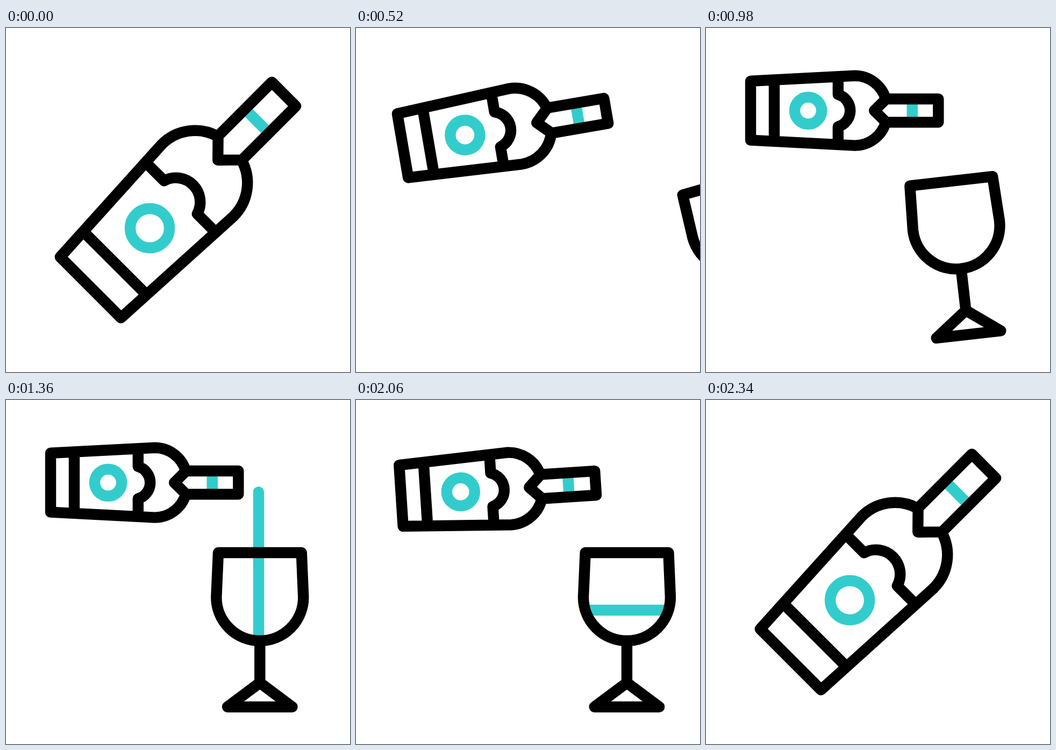
An HTML page with a canvas for the animation above (2.4 s loop, 640 by 640 pixels).

```html
<!DOCTYPE html>
<html lang="en">
<head>
<meta charset="utf-8">
<title>Pouring wine</title>
<style>
  html, body { margin: 0; width: 100%; height: 100%; overflow: hidden; background: #fff; }
  canvas { display: block; width: 640px; height: 640px; }
</style>
</head>
<body>
<canvas id="stage" width="640" height="640"></canvas>
<script>
const ctx = document.getElementById('stage').getContext('2d');
const LOOP = 2400, TICK = 20, STROKE = 20.4;
const INK = '#000', TEAL = '#33cccc';

// Bottle in its own axes: x runs towards the mouth, origin at its centre.
const bottle = new Path2D(
  'M136 -31.5 A87.5 87.5 0 0 0 52 -94.5 L-230 -80 V80 L52 94.5 A87.5 87.5 0 0 0 136 31.5' +
  'M137 -31.5 H278.5 V31.5 H137 L105 0 Z' +
  'M-166 -83 V83' +
  'M7 -92 V-43.5 A45.3 45.3 0 0 1 7 43.5 V92');
const ring = new Path2D('M-37.7 0 A36.5 36.5 0 1 1 -110.7 0 A36.5 36.5 0 1 1 -37.7 0 Z');
const band = new Path2D('M207.7 -28 V28');

const bowl = new Path2D('M395 284 L391.3 367 A81 81 0 0 0 553.3 367 L549.8 284 Z');
const foot = new Path2D('M472.3 448 V526 L412 571 H532.5 L472.3 526');
const stream = new Path2D('M383 157 H452 Q470 157 470 175 V470');
const STREAM_DROP = 77; // y on the vertical part = distance along the stream + this

const progress = (t, from, to) => Math.min(1, Math.max(0, (t - from) / (to - from)));
const smooth = (t, from, to) => {
  const x = progress(t, from, to);
  return x * x * (3 - 2 * x);
};
const easeOut = (t, from, to) => 1 - (1 - progress(t, from, to)) ** 1.6;
const mix = (a, b, k) => a + (b - a) * k;

function stroke(path, color, scale = 1, cap = 'round') {
  ctx.lineWidth = STROKE / scale;
  ctx.lineCap = cap;
  ctx.strokeStyle = color;
  ctx.stroke(path);
}

function drawBottle(t) {
  const pose = smooth(t, 100, 700) - smooth(t, 2000, 2340);
  const scale = mix(1, 0.687, pose);
  ctx.save();
  ctx.translate(mix(320, 241, pose), mix(320, 153.7, pose));
  ctx.rotate(-Math.PI / 4 * (1 - pose));
  ctx.scale(scale, scale);
  stroke(band, TEAL, scale, 'butt');
  stroke(ring, TEAL, scale);
  stroke(bottle, INK, scale);
  ctx.restore();
}

function drawStream(t, level) {
  if (t < 1200 || t >= 2000) return;
  const tail = 315 * easeOut(t, 1200, 2000);
  const head = Math.min(385 * easeOut(t, 1200, 1360), level - STREAM_DROP);
  if (head <= tail) return;
  ctx.save();
  ctx.setLineDash([head - tail, 1000]);
  ctx.lineDashOffset = 0;
  ctx.lineDashOffset = -tail;
  stroke(stream, TEAL);
  ctx.restore();
}

function drawGlass(t, level) {
  if (t < 400) return;
  const shift = 384 * (1 - smooth(t, 400, 700) + smooth(t, 2000, 2340));
  const tilt = -15.8 * (1 - smooth(t, 700, 1200));
  ctx.save();
  ctx.translate(472.3 + shift, 427.4);
  ctx.rotate(tilt * Math.PI / 180);
  ctx.translate(-472.3, -427.4);
  if (t > 1320) {
    ctx.save();
    ctx.clip(bowl);
    ctx.fillStyle = TEAL;
    ctx.fillRect(380, level - STROKE / 2, 185, STROKE);
    ctx.restore();
  }
  stroke(bowl, INK);
  stroke(foot, INK);
  ctx.restore();
}

function draw(t) {
  const level = mix(448, 391, smooth(t, 1320, 2000));
  ctx.fillStyle = '#fff';
  ctx.fillRect(0, 0, 640, 640);
  ctx.lineJoin = 'round';
  drawStream(t, level);
  drawBottle(t);
  drawGlass(t, level);
}

const start = performance.now();
function frame() {
  const t = (performance.now() - start) % LOOP;
  draw(Math.floor(t / TICK) * TICK);
  requestAnimationFrame(frame);
}
frame();
</script>
</body>
</html>
```
